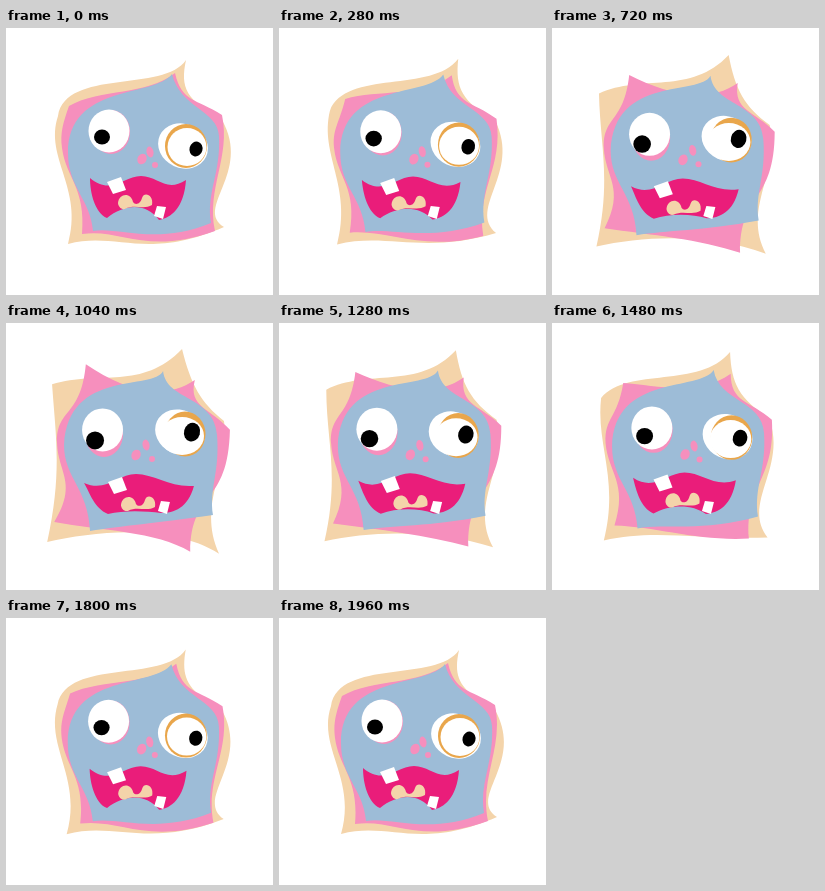
An HTML page that plays this animation: 267x267 px, repeating every 2000 ms.

```html
<!DOCTYPE html>
<html>
<head>
<meta charset="utf-8">
<style>
html, body { margin: 0; width: 100%; height: 100%; overflow: hidden; background: #fff; }
svg { display: block; width: 100%; height: 100%; }
</style>
</head>
<body>
<svg id="stage" viewBox="0 0 267 267"></svg>
<script>
const TAN = '#f4d4aa', PINK = '#f68fbd', BLUE = '#9dbcd7', RED = '#ea1d7a',
      ORANGE = '#e9a64b', WHITE = '#fff', BLACK = '#000';
const LOOP = 2000, STEP = 40;
const stage = document.getElementById('stage');
const parts = [];
const mix = (a, b, w) => a + (b - a) * w;

function add(tag, fill, pose) {
  const el = document.createElementNS('http://www.w3.org/2000/svg', tag);
  el.setAttribute('fill', fill);
  stage.append(el);
  parts.push(w => {
    for (const [name, value] of Object.entries(pose(w))) el.setAttribute(name, value);
  });
}

// Outline that morphs between two paths of the same structure
function blob(fill, calm, spiky) {
  const ends = spiky.match(/\d+/g);
  add('path', fill, w => {
    let i = 0;
    return { d: calm.replace(/\d+/g, n => mix(+n, +ends[i++], w)) };
  });
}

// Fixed outline that drifts by dx, dy
function drift(fill, d, dx, dy) {
  add('path', fill, w => ({ d, transform: `translate(${dx * w} ${dy * w})` }));
}

// Each pose: cx, cy, rx, ry
function oval(fill, calm, spiky, turn = 0) {
  add('ellipse', fill, w => {
    const [cx, cy, rx, ry] = calm.map((v, i) => mix(v, spiky[i], w));
    return { cx, cy, rx, ry, transform: `rotate(${turn} ${cx} ${cy})` };
  });
}

function spot(x, y, rx, ry, dx, dy, turn) {
  oval(PINK, [x, y, rx, ry], [x + dx, y + dy, rx, ry], turn);
}

// Head layers, back to front
blob(TAN,
  `M180 32 C158 65 60 40 52 88 C38 130 78 160 62 216 C110 203 140 233 218 199
   C188 180 246 145 216 92 C180 72 174 60 180 32Z`,
  `M176 26 C135 68 95 47 46 61 C50 115 56 150 41 219 C90 208 165 200 213 231
   C190 180 225 145 218 98 C195 80 185 62 176 26Z`);
blob(PINK,
  `M169 45 C140 68 95 60 63 78 C57 95 54 105 56 120 C60 150 80 160 76 206
   C115 200 140 228 209 203 C200 160 225 130 216 87 C190 70 176 75 169 45Z`,
  `M189 57 C155 80 115 65 80 41 C75 95 50 85 51 120 C52 150 72 160 48 199
   C95 208 150 208 184 229 C185 165 222 185 224 107 C205 85 182 85 189 57Z`);
blob(BLUE,
  `M166 46 C148 70 62 55 62 125 C62 160 84 170 87 203 C110 198 150 218 205 195
   C200 165 215 145 213 108 C212 82 174 80 166 46Z`,
  `M157 48 C148 68 62 45 58 122 C58 155 82 165 84 208 C115 203 150 200 207 192
   C203 165 214 150 211 112 C208 72 160 78 157 48Z`);

// Eyes
oval(PINK, [105, 104, 19, 22], [98, 111, 19, 23]);
oval(WHITE, [103, 103, 20.5, 21.5], [96.5, 107, 20.5, 21.5]);
oval(BLACK, [96, 109, 8, 7.5], [89, 117.5, 9, 9]);
oval(WHITE, [177, 118, 25.5, 22], [174, 109, 25.5, 22], 25);
oval(ORANGE, [180, 118, 21, 22], [179, 111, 20.5, 22.5]);
oval(WHITE, [181, 119, 19.5, 19], [176, 113, 22, 19]);
oval(BLACK, [190, 121, 6.5, 7.5], [186, 109, 8, 9.5], 15);

// Nose
spot(136, 131, 4.5, 5.5, -6, 1, 25);
spot(144, 124, 3.5, 5.5, -4, -2, -12);
spot(149, 137, 3, 3, -3, -1, 0);

// Mouth, tongue and teeth
blob(RED,
  `M84 150 C105 168 118 148 135 148 S160 165 180 152 C178 180 165 190 153 192
   C140 174 118 176 101 190 C89 185 84 165 84 150Z`,
  `M78 160 C100 170 112 151 130 151 S165 165 188 163 C182 185 168 190 155 190
   C140 188 118 187 102 191 C88 185 84 170 78 160Z`);
drift(TAN, `M112 175 C113 165 125 164 127 174 C129 177 134 177 136 170
  C138 163 148 167 146 177 C138 182 128 176 119 181 C115 182 112 178 112 175Z`, 3, 7);
drift(WHITE, 'M101 154L115 149L120 162L107 166Z', 1, 5);
drift(WHITE, 'M151 178L160 179L157 191L148 188Z', 4, 0);

function draw(now) {
  const t = Math.floor(now % LOOP / STEP) * STEP;
  const w = (1 - Math.cos(t / (LOOP - STEP) * 2 * Math.PI)) / 2;
  parts.forEach(part => part(w));
  requestAnimationFrame(draw);
}
draw(0);
</script>
</body>
</html>
```
